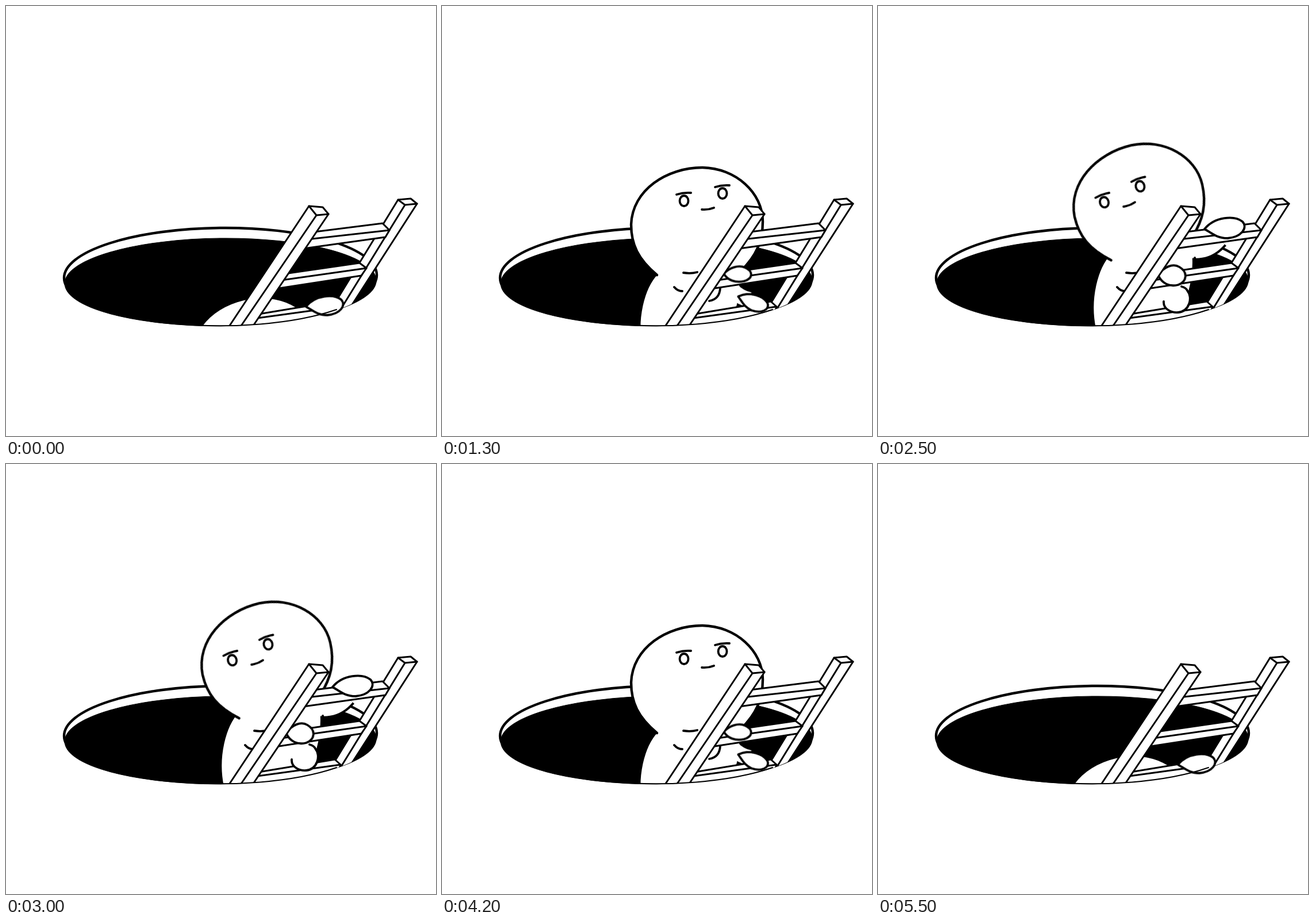
An HTML page without scripts for the animation above (5.6 s loop, 748 px wide and 748 px high).

```html
<!DOCTYPE html>
<html lang="en">
<head>
<meta charset="utf-8">
<title>Climbing out of the hole</title>
<style>
html, body { margin: 0; width: 100%; height: 100%; overflow: hidden; background: #fff; }
svg { display: block; width: 100%; height: 100%; }
path, ellipse { fill: #fff; stroke: #000; stroke-width: 3; stroke-linejoin: round; stroke-linecap: round; }
.bold { stroke-width: 4.4; }
.line { fill: none; stroke-width: 3.8; }
.edge, .limb { fill: none; stroke-linecap: butt; stroke-width: 34; }
.limb { stroke: #fff; stroke-width: 26; }
.hand path { stroke-width: 3.8; vector-effect: non-scaling-stroke; }

/* 28 held poses up, then the same ones back down; steps(n) holds each for 100 ms. */
.climber, .head, .face, .elbow, .arm, .hand {
  animation: 2.8s -30ms infinite alternate steps(5);
}
.climber { animation-name: climb; }
.head { animation-name: lean; transform-origin: 477px 345px; }
.face { animation-name: look; }
.elbow { animation-name: elbow; }
.arm { animation-name: swing; }
.right { animation-name: reach; }
.left { animation-name: grip; }
.foot { animation-name: step; }

@keyframes climb {
  0% { transform: translate(-40px, 260px); animation-timing-function: steps(6); }
  21.43% { transform: translate(-38px, 172px); animation-timing-function: steps(7); }
  46.43% { transform: translate(-34px, 35px); animation-timing-function: steps(2); }
  53.57% { transform: translate(-10px, 8px); animation-timing-function: steps(3); }
  64.29% { transform: none; animation-timing-function: steps(2); }
  71.43% { transform: translate(4px, -4px); animation-timing-function: steps(2); }
  78.57% { transform: translate(0, -8px); animation-timing-function: steps(3); }
  89.29%, 100% { transform: translate(-4px, 0); }
}
@keyframes lean {
  0%, 71.43% { transform: translate(0, 0) rotate(0deg); animation-timing-function: steps(2); }
  78.57% { transform: translate(-13px, -5px) rotate(-5deg); animation-timing-function: steps(3); }
  89.29%, 100% { transform: translate(-20px, -4px) rotate(-13deg); }
}
@keyframes look {
  0%, 46.43% { transform: translate(2px, -4px); }
  64.29%, 71.43% { transform: translate(0, 0); }
  89.29%, 100% { transform: translate(-34px, 24px); }
}
@keyframes elbow {
  0% { transform: translate(-20px, 237px); animation-timing-function: steps(13); }
  46.43% { transform: translate(-12px, 11px); }
  64.29%, 71.43% { transform: translate(1px, 0); }
  89.29%, 100% { transform: translate(0, 11px); }
}
@keyframes swing {
  0% { transform: translate(525px, 418px) rotate(-62deg) scale(2, 1); animation-timing-function: steps(13); }
  46.43% { transform: translate(525px, 418px) rotate(62deg) scale(1, 1); }
  64.29%, 100% { transform: translate(525px, 418px) rotate(0deg) scale(1, 1); }
}
@keyframes reach {
  0%, 25% { transform: translate(557px, 521px) rotate(0deg) scale(.93); animation-timing-function: steps(6); }
  46.43% { transform: translate(543px, 516px) rotate(24deg) scale(.78); }
  64.29%, 71.43% { transform: translate(615px, 387px) rotate(0deg) scale(1); }
  89.29%, 100% { transform: translate(606px, 386px) rotate(0deg) scale(1); }
}
@keyframes grip {
  0%, 17.86% { transform: translate(466px, 480px) scale(.1); animation-timing-function: steps(3); }
  28.57%, 46.43% { transform: translate(514px, 465px) scale(.95, .76); }
  64.29%, 71.43% { transform: translate(516px, 467px) scale(1); }
  89.29%, 100% { transform: translate(511px, 467px) scale(.95, 1); }
}
@keyframes step {
  0%, 25% { transform: translate(557px, 521px) scale(.5); animation-timing-function: steps(6); }
  46.43% { transform: translate(544px, 516px) scale(.5); }
  64.29%, 71.43% { transform: translate(528px, 508px) scale(1); }
  89.29%, 100% { transform: translate(520px, 509px) scale(1); }
}
</style>
</head>
<body>
<svg viewBox="0 0 748 748">
  <defs>
    <clipPath id="above"><path d="M0 0H748V470.5H647A274 86.5 0 0 1 99 470.5H0Z"/></clipPath>
    <path id="bone" d="M0 0Q45 20 72 -12" style="fill:inherit;stroke:inherit;stroke-width:inherit;stroke-linecap:inherit"/>
    <g id="eye">
      <ellipse class="line" rx="7.5" ry="9"/>
      <path class="line" d="M-13 -11Q-1 -15 12 -14"/>
    </g>
  </defs>

  <!-- hole -->
  <g transform="rotate(-.6 373 470)">
    <ellipse class="bold" cx="373" cy="470.5" rx="272" ry="84.5"/>
    <ellipse cx="373" cy="480" rx="271" ry="76" style="fill:#000;stroke-width:1"/>
  </g>

  <g clip-path="url(#above)">
    <!-- climber -->
    <g class="climber">
      <g class="arm edge" stroke="#000"><use href="#bone"/></g>
      <path class="bold" d="M460 400L408 430C384 455 370 510 381 562V600H510C535 530 555 490 553 440L557 390"/>
      <g class="arm limb"><use href="#bone"/></g>
      <path class="line" d="M555 438Q557 446 555 453M518 455Q517 475 499 478"/>
      <g class="head">
        <path class="bold" d="M408 433C375 405 363 380 363 345C365 285 425 246 487 246C545 247 592 290 592 340C592 375 580 400 555 425"/>
        <g class="face">
          <use href="#eye" x="453" y="308"/>
          <use href="#eye" x="520" y="295"/>
          <path class="line" d="M484 323Q495 324 505 320"/>
        </g>
      </g>
    </g>
    <path class="elbow line" d="M432 453Q445 455 456 452M416 478Q422 485 430 485"/>

    <!-- far post and rungs -->
    <path d="M682 337L704 335L715 344L592 535H561Z"/>
    <path d="M682 337L694 346L715 344M694 346L577 536" fill="none"/>
    <path d="M520 395L655 378L667 390L660 402L510 423Z"/>
    <path d="M515 407L667 390"/>
    <path d="M470 468L615 447L627 456L618 469L455 494Z"/>
    <path d="M465 479L627 456"/>
    <path d="M415 540L572 514L582 523L575 545L415 580Z"/>
    <path d="M415 546L582 523"/>
  </g>

  <g class="foot hand"><path d="M-23 5C-24 18 -10 25 2 24C22 22 28 -2 18 -14C16 -18 12 -20 8 -21"/></g>
  <g class="right hand"><path d="M-38 2C-24 10 -16 18 2 18C26 16 38 0 28 -11C14 -22 -20 -20 -38 2Z"/></g>
  <g class="left hand"><path d="M-25 1C-15 -13 2 -20 14 -13C30 -4 28 12 12 18C-4 22 -18 16 -25 1Z"/></g>

  <!-- near post -->
  <g clip-path="url(#above)">
    <path d="M527 348L551 350L561 362L424 565H383Z"/>
    <path d="M527 348L540 364L561 362M540 364L403 565" style="fill:none"/>
  </g>
  <path d="M101 478A273 86 0 0 0 575 528" style="fill:none;stroke-width:2"/>
</svg>
</body>
</html>
```
